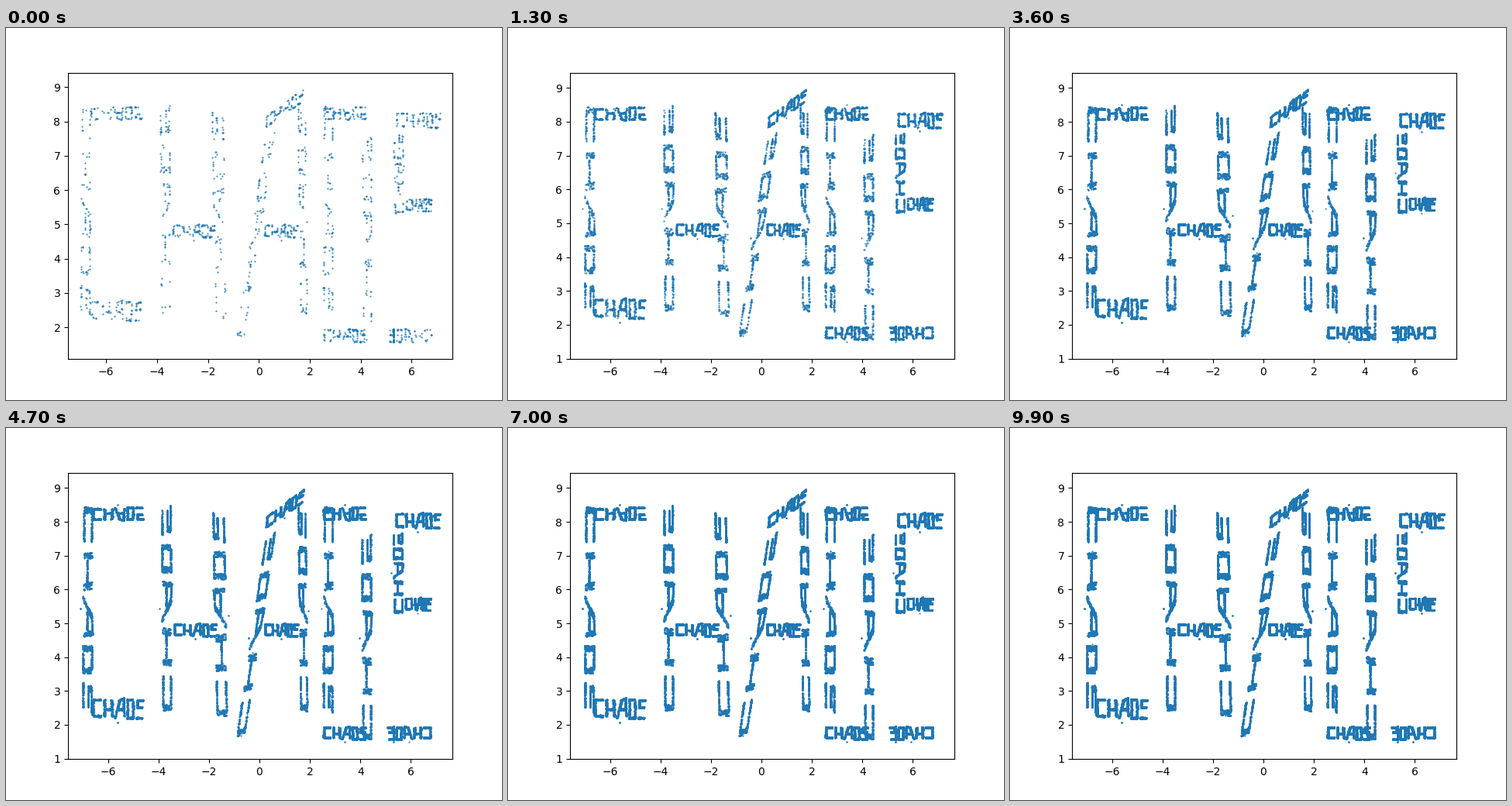
A matplotlib script for the animation above (10 s loop, 640 by 480 pixels).

```python
import random
from math import exp

import matplotlib.pyplot as plt
import numpy as np
from matplotlib.animation import FuncAnimation

FRAMES = 100
STEP = 1000     # points in one run
PAD = 0.5
THICK = 0.053   # stroke width, as a fraction of the word's height
TALL = 0.429    # full stroke height, as a fraction of the word's width
TOP, BOTTOM = 8.513, 1.487
UP, DOWN = 4.569, 5.43   # anchors of uprights that read upwards or downwards


# Each stroke of the word is the whole word, shrunk: an affine map
# (a, b, c, d, e, f) with x' = ax + by + e and y' = cx + dy + f.
def level(x, y, length, thick=THICK):
    return length, 0, 0, thick, x, y


def upright(x, y, rise):
    return 0, THICK, rise, 0, x, y


def slant(x, y, along, across):
    return along[0], across[0], along[1], across[1], x, y


# In the order in which their anchor dots first show
STROKES = [
    level(0.861, 4.536, 0.093),                                   # A bar
    level(-2.555, 4.536, 0.119),                                  # H bar
    level(3.363, TOP, 0.119, -THICK),                             # O top
    level(-5.619, 2.057, 0.143, 0.083),                           # C bottom
    upright(-7.083, DOWN, -TALL),                                 # C back
    upright(3.972, UP, TALL),                                     # O right
    upright(-3.952, DOWN, TALL),                                  # H left
    slant(6.275, 7.716, (0.124, 0.0007), (-0.0018, 0.063)),       # S top
    level(3.363, BOTTOM, 0.119),                                  # O bottom
    slant(-0.421, 4.569, (0.0852, 0.42), (0.0506, 0.0157)),       # A left
    level(5.305, BOTTOM, 0),                                      # S tick
    slant(0.976, 8.113, (0.1044, 0.0571), (0.0053, 0.0527)),      # A top
    level(6.279, 5.298, 0.071),                                   # S middle
    level(-5.619, TOP, 0.143, -THICK),                            # C top
    slant(-1.226, 5.235, (-0.0124, 0.4238), (-0.065, 0.0019)),    # H right
    slant(1.934, 5.37, (-0.0081, 0.4239), (-0.0418, 0.0042)),     # A right
    upright(2.447, DOWN, -TALL),                                  # O left
    upright(5.215, 6.483, 0.167),                                 # S back
    level(5.941, BOTTOM, -0.121),                                 # S bottom
]


def play(rng, opener):
    """One chaos game from the origin, beginning with the given stroke."""
    x = y = 0.0
    stroke = opener
    for _ in range(STEP):
        a, b, c, d, e, f = stroke
        x, y = a * x + b * y + e, c * x + d * y + f
        yield x, y
        stroke = rng.choice(STROKES)


def build():
    rng = random.Random(7)
    shown, points = 0, []
    for n in range(FRAMES + 1):   # the first frame holds two runs
        # New openers grow rarer, as when collecting at random
        newest = int(len(STROKES) * (1 - exp(-n / 15)))
        if newest >= shown:
            shown = newest + 1
            opener = STROKES[newest]
        else:
            opener = rng.choice(STROKES[:shown])
        points.extend(play(rng, opener))
    return np.array(points)


points = build()
low = np.minimum.accumulate(points) - PAD
high = np.maximum.accumulate(points) + PAD

fig, ax = plt.subplots(figsize=(6.4, 4.8), dpi=100)
dots, = ax.plot([], [], ".", ms=1, color="C0")


def update(k):
    n = (k + 2) * STEP
    dots.set_data(*points[:n].T)
    ax.set_xlim(low[n - 1, 0], high[n - 1, 0])
    ax.set_ylim(low[n - 1, 1], high[n - 1, 1])
    return dots,


anim = FuncAnimation(fig, update, frames=FRAMES, interval=100,
                     repeat=True, repeat_delay=0)
plt.show()
```
